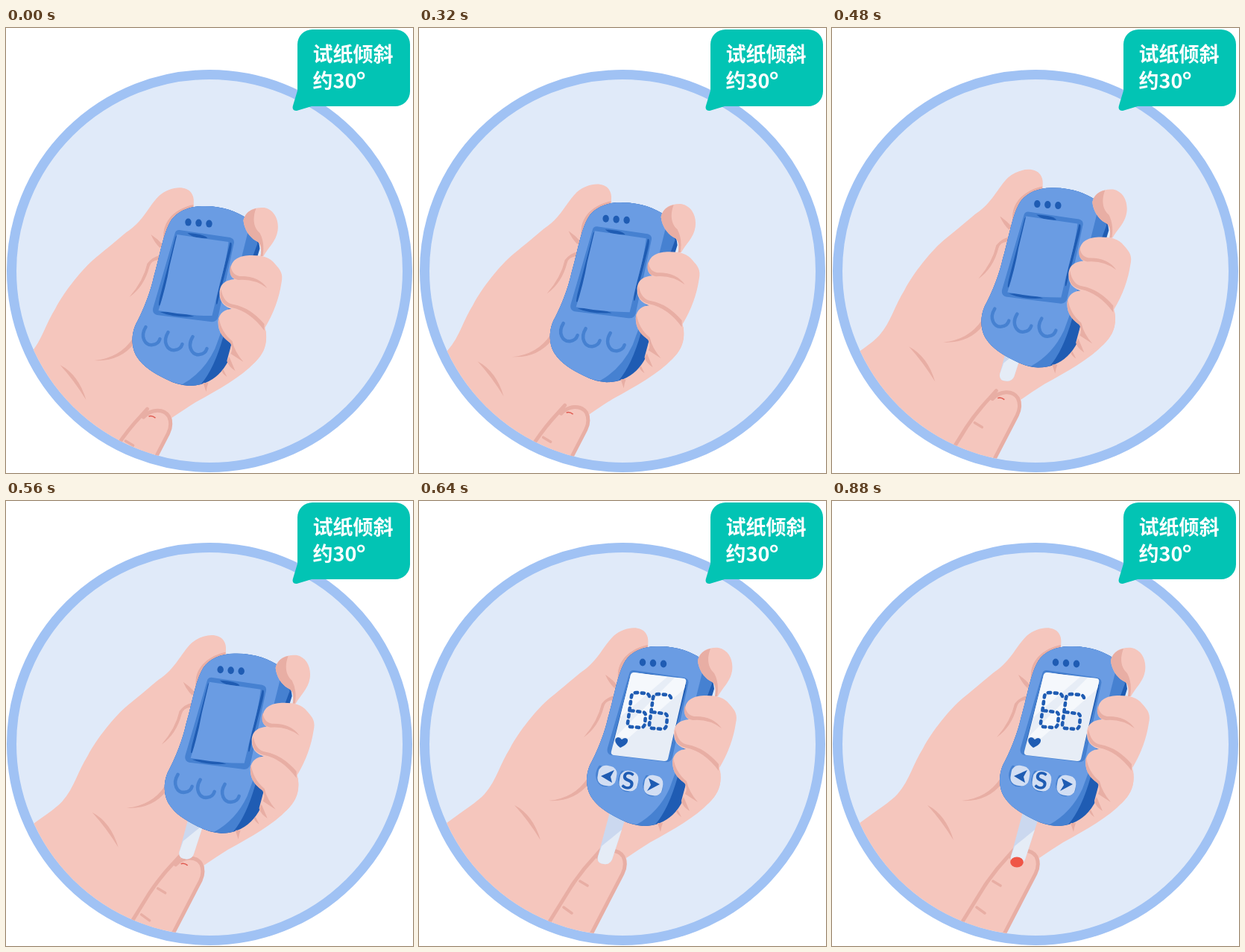
These frames come from a looping animation (546 by 597 pixels, 2.92 s). An HTML page:

```html
<!DOCTYPE html>
<html lang="zh-CN">
<head>
<meta charset="utf-8">
<style>
  html, body { margin: 0; width: 100%; height: 100%; overflow: hidden; background: #fff; }
  svg { display: block; }
  .skin { fill: #f5c6bd; }
  .shade { fill: #e8aea4; }
  .crease { fill: none; stroke: #e8aea4; stroke-width: 5; stroke-linecap: round; stroke-linejoin: round; }
  .thin { stroke-width: 3.5; }
  .light { fill: #6a9ce3; }
  .mid { fill: #4681d1; }
  .dark { fill: #1f5cb3; }
  .hook { fill: none; stroke: #4681d1; stroke-width: 4.5; stroke-linecap: round; }
  .digit { fill: none; stroke: #1f5cb3; stroke-width: 4.6; stroke-linecap: round; stroke-dasharray: 3.2 5.6; }
  .label { font: 700 27px "Noto Sans CJK SC", "Noto Sans CJK", sans-serif; fill: #fff; }
  .degree { font-size: 33px; }
  .key { font: 700 32px Lato, sans-serif; text-anchor: middle; }
</style>
</head>
<body>
<svg width="546" height="597" viewBox="0 0 546 597">
  <defs>
    <clipPath id="inside"><ellipse cx="273" cy="326" rx="259" ry="257"/></clipPath>
    <path id="hook" d="M-7-11C-15 2-8 14 2 13Q10 12 12 5"/>
    <rect id="button" x="-12" y="-13" width="25" height="27" rx="10" transform="rotate(9)"/>
    <path id="six" d="M309 262Q308 258 303 258L292 257Q286 257 285 262L280 298Q280 303 285 303
      L297 304Q302 304 303 299L304 288Q304 283 299 283L283 281"/>
  </defs>
  <ellipse cx="273" cy="326" rx="265.5" ry="263.5" fill="#e0eaf9" stroke="#a0c2f4" stroke-width="13"/>

  <g clip-path="url(#inside)"><g id="hand">
    <!-- palm, thumb and forefinger of the other hand -->
    <path class="skin" d="M-60 507L37 432C60 415 78 404 88 393C104 375 109 352 122 332
      C134 309 158 279 176 264C192 251 205 240 217 230C240 215 246 196 261 181
      C276 168 297 167 304 177C309 184 307 191 307 198L320 225L360 330L404 362
      C407 382 400 394 390 404C370 425 341 441 310 458Q294 468 278 479Q280 489 273 503
      L232 580L180 680L-60 680Z"/>
    <path class="shade" d="M307 193C284 198 269 212 267 230L266 248L280 240L306 205Z
      M128 408Q153 421 163 455Q147 429 128 408Z
      M174 402Q208 399 226 372L228 379Q208 404 174 402Z
      M221 317Q240 295 245 272Q252 263 262 261L260 267Q250 268 248 276Q241 303 221 317Z
      M250 233Q259 239 266 247L262 251Q254 243 250 233Z"/>
    <path class="crease" d="M174 566L205 516Q219 495 236 477L245 467
      M240 478C250 467 267 466 274 477Q279 488 273 500L231 581"/>
    <path class="crease thin" d="M216 510L226 516M194 545L205 553"/>
    <path d="M247 477q4-2 9 2" fill="none" stroke="#df5a50" stroke-width="1.5"/>

    <g id="strip">
      <path fill="#cbd8ef" d="M262 395L287 395L259 481Q256 488 248 487Q238 486 240 477Z"/>
      <path fill="#e5ecf6" d="M245 463L272 441L259 481Q256 488 248 487Q238 486 240 477Z"/>
    </g>

    <!-- meter -->
    <path class="dark" d="M322 195C302 194 285 202 277 214C266 232 262 262 254 289C249 311 241 331 232 349
      C222 366 224 386 231 397C240 411 254 419 270 427Q285 435 301 436Q314 436 323 432Q343 424 354 402
      L359 374L396 252C395 238 387 222 378 211C366 203 348 195 322 195Z"/>
    <path class="mid" d="M322 195C302 194 285 202 277 214C266 232 262 262 254 289C249 311 241 331 232 349
      C222 366 224 386 231 397C240 411 254 419 270 427Q285 435 301 436Q310 436 317 434Q335 413 347 370
      L393 245C391 234 386 222 378 211C366 203 348 195 322 195Z"/>
    <path class="light" d="M322 195C302 194 285 202 277 214C266 232 262 262 254 289C249 311 241 331 232 349
      C222 366 224 386 231 397C240 411 254 419 270 427Q282 433 292 434Q321 418 336 386Q352 345 364 294
      L382 222L378 211C366 203 348 195 322 195Z"/>
    <g class="dark">
      <ellipse cx="300" cy="216.5" rx="4.2" ry="5"/>
      <ellipse cx="314" cy="217.5" rx="4.2" ry="5"/>
      <ellipse cx="328" cy="218.5" rx="4.2" ry="5"/>
    </g>
    <path class="mid" d="M288 227L356 237Q363 239 361 246L340 344Q338 351 330 350L258 341Q251 339 253 331L282 232Q283 227 288 227Z"/>
    <path class="dark" d="M283 236Q288 229 286 242L264 325Q258 335 262 317Z
      M299 231Q322 232 326 238Q307 239 299 231ZM356 244Q360 242 357 256L339 326Q336 330 339 314Z
      M262 337Q286 335 308 343Q281 345 262 337Z"/>
    <path class="light" d="M285 233L354 243Q352 264 342 300L332 342Q296 342 260 335Q270 304 275 275Z"/>
    <use href="#hook" class="hook" x="250" y="368"/>
    <use href="#hook" class="hook" x="280" y="375"/>
    <use href="#hook" class="hook" x="313" y="381"/>

    <g id="lit">
      <path fill="#e7edf6" d="M288 230L355 238Q359 239 358 243L334 346Q333 349 329 349L261 341Q257 340 258 336L284 233Q285 230 288 230Z"/>
      <path fill="#f5f8fc" d="M288 230L333 236L270 290L284 233ZM343 237L355 238Q359 239 358 243L356 252L281 318L264 316Z"/>
      <use href="#six" class="digit"/>
      <use href="#six" class="digit" x="29" y="2"/>
      <path class="dark" d="M270 331C262 325 261 318 267 317Q270 317 272 320Q277 316 280 320C281 326 274 329 270 331Z"/>
      <g fill="#d2def3">
        <use href="#button" x="252" y="368"/>
        <use href="#button" x="281" y="375"/>
        <use href="#button" x="314" y="381"/>
      </g>
      <path class="dark" d="M244 369L262 361L257 370L259 378ZM323 380L308 372L311 381L306 389Z"/>
      <text class="key dark" x="280.5" y="386.5" transform="rotate(6 281 375)">S</text>
    </g>

    <!-- fingers wrapped round the meter -->
    <path class="skin" d="M374 214C377 200 390 196 402 197C416 200 422 214 420 228C418 242 407 251 401 262L397 262
      C399 250 397 244 390 241C382 236 375 226 374 214Z"/>
    <path class="shade" d="M374 214Q377 201 391 198C385 214 389 225 396 231Q403 244 400 262L397 262
      C399 250 397 244 390 241C382 236 375 226 374 214Z"/>
    <path class="skin" d="M357 280C357 266 370 261 385 261C400 261 410 264 416 272C423 280 428 285 425 298
      C422 318 415 338 403 358C407 376 404 390 388 406L356 420L352 402L358 380C348 372 340 365 340 350
      C341 338 350 333 358 333C348 329 342 324 342 312C342 298 352 294 362 293C357 290 356 286 357 280Z"/>
    <path class="shade" d="M357 274Q352 291 367 294Q389 292 406 305Q394 288 369 289Q358 287 357 274Z
      M344 306Q339 326 358 331Q383 336 402 362L402 353Q383 331 361 327Q347 325 344 306Z
      M341 344Q337 366 356 378Q361 386 357 393L374 404Q362 390 359 376Q344 364 341 344Z
      M355 397L363 416Q354 410 352 403ZM347 414L352 424Q346 420 345 416Z
      M320 432L327 432Q325 437 324 444Z"/>
    <ellipse id="drop" cx="248" cy="484.5" rx="8.8" ry="7" fill="#ef5546"/>
  </g></g>

  <path fill="#02c4b4" d="M411 2H522A20 20 0 0 1 542 22V85A20 20 0 0 1 522 105H410L390 111Q383 111 385 104L391 84V22A20 20 0 0 1 411 2Z"/>
  <text class="label" x="411.5" y="45">试纸倾斜</text>
  <text class="label" x="411.5" y="81">约30<tspan class="degree" dx="-1" dy="3">°</tspan></text>
</svg>
<script>
  const LOOP = 2920, STEP = 40;
  const el = id => document.getElementById(id);
  const move = (id, x, y) => el(id).setAttribute('transform', `translate(${x} ${y})`);
  const show = (id, on) => el(id).setAttribute('visibility', on ? 'visible' : 'hidden');
  const start = performance.now();

  function draw(now) {
    const t = Math.max(0, now - start) % LOOP;
    // steps left until the finger reaches the strip at 640 ms
    const left = Math.min(9, Math.max(0, 16 - Math.floor(t / STEP)));
    move('hand', -6.17 * left, 4.9 * left);
    move('strip', 2.5 * left, -8.25 * left);
    show('lit', left === 0);
    show('drop', t >= 880);
    requestAnimationFrame(draw);
  }
  draw(start);
</script>
</body>
</html>
```
